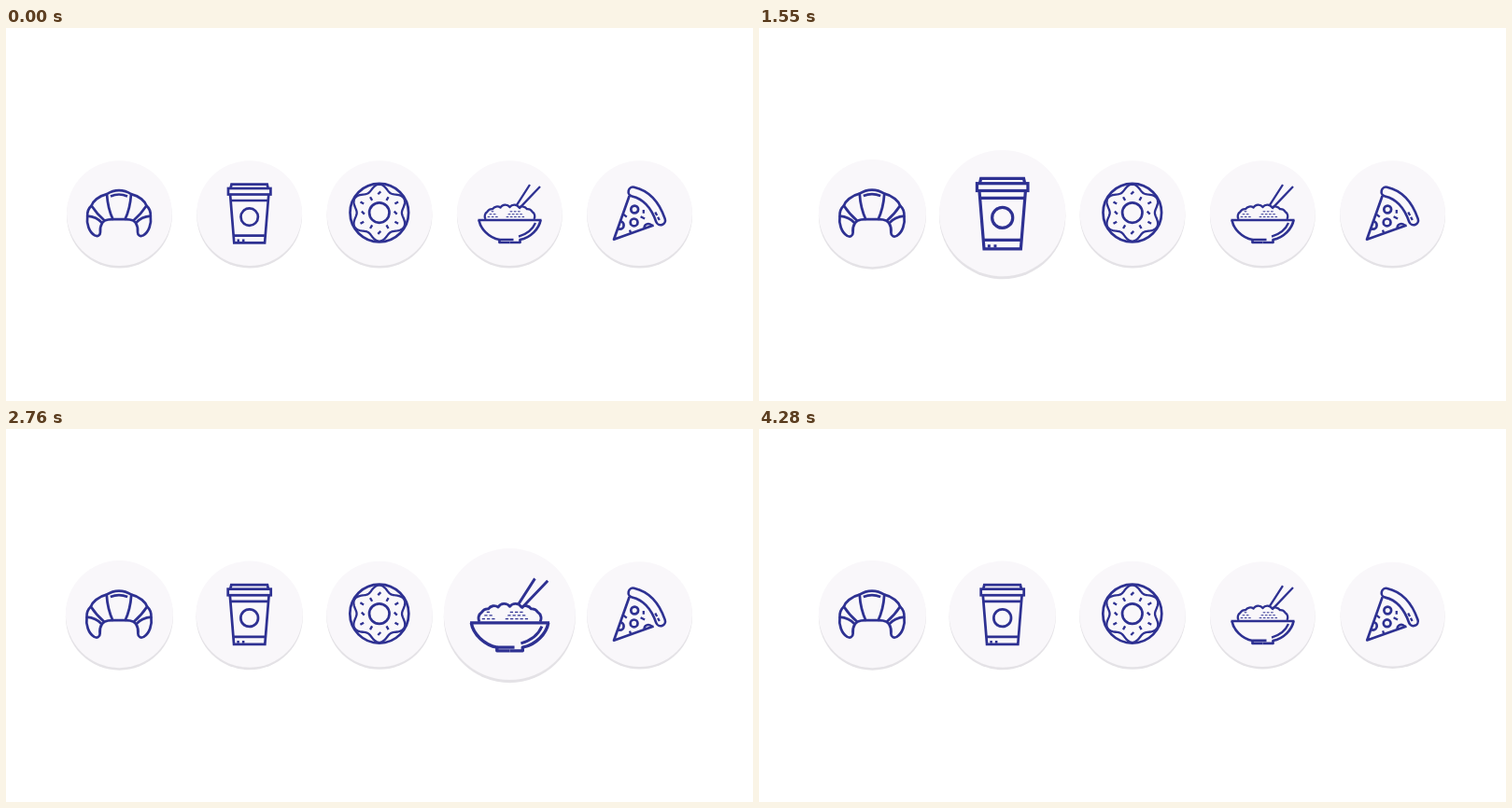
Write an HTML page that moves like this. It is 800 by 400 pixels and loops after 4.35 s.

```html
<!DOCTYPE html>
<html lang="en">
<head>
<meta charset="utf-8">
<title>Food icons</title>
<style>
  html, body { margin: 0; width: 100%; height: 100%; overflow: hidden; background: #fff; }
  svg { display: block; width: 800px; height: 400px; }
  .icon { fill: none; stroke: #2e3192; stroke-width: 2.7; stroke-linejoin: round; }
  .cup { stroke-linejoin: miter; }
  .thin { stroke-width: 2.3; }
  .grain { stroke-width: 1; }
  .crust { stroke-width: 12.6; stroke-linecap: round; }
  .crust.inside { stroke: #f9f7fa; stroke-width: 7.4; }
  .shadow { fill: #e4e2e6; }
  .edge { fill: #98969b; visibility: hidden; }
  .used .edge { visibility: visible; }
  .disc { fill: #f9f7fa; }
</style>
</head>
<body>
<svg viewBox="0 0 800 400">
  <defs>
    <g id="plate">
      <circle class="shadow" cy="2.500" r="56.400"/>
      <circle class="edge" cy="0.500" r="56.400"/>
      <circle class="disc" r="56.400"/>
    </g>
    <g id="wing">
      <path d="M0 -24.500Q-7 -24.500 -13 -20.500Q-12 -5 -6.500 6.500H0"/>
      <path d="M-13 -20.500C-22 -18.500 -28 -12.500 -29.500 -8C-25 -1 -20 4 -15.500 8Q-12 6.500 -6.500 6.500"/>
      <path d="M-29.500 -8C-33 -5 -34 -1 -33.800 3C-27 3.500 -22 6 -18 10.500L-15.500 8"/>
      <path d="M-33.800 3C-35 11 -32 20.500 -26 23.800C-23 25.300 -20 24 -20 20.500C-20.500 16 -19.500 13 -18 10.500"/>
    </g>
    <path id="side" d="M-33 7.400C-31.500 16.400 -22.500 26.400 -11 28.400V31.400H0"/>
    <path id="slice" d="M-11 -18.600L-27.600 28.100L15 12.900"/>
    <path id="arc" d="M-7 -23Q13.500 -18.300 22.400 7.600"/>
    <clipPath id="inSlice"><use href="#slice"/></clipPath>
  </defs>

  <g class="item">
    <use href="#plate"/>
    <g class="icon" transform="translate(-0.400 0)">
      <use href="#wing"/>
      <use href="#wing" transform="scale(-1 1)"/>
      <path d="M-9 -18.200Q0 -22 9 -18.200"/>
    </g>
  </g>

  <g class="item">
    <use href="#plate"/>
    <g class="icon cup">
      <path d="M-20.200 -26.600L-19.200 -31H19L20 -26.600"/>
      <rect x="-22.700" y="-26.600" width="45.400" height="6.500"/>
      <path d="M-20.600 -20L-16.400 31.800H16.400L20.600 -20M-20 -13.600H20M-17 24H17"/>
      <circle cy="4" r="9.200"/>
      <path d="M-13.200 29.300h8" stroke-dasharray="2.500 3"/>
    </g>
  </g>

  <g class="item">
    <use href="#plate"/>
    <g class="icon" transform="translate(-0.200 -0.500)">
      <circle r="31.300"/>
      <circle r="10.700"/>
      <path id="icing" class="thin"/>
      <path id="sprinkles" class="thin"/>
    </g>
  </g>

  <g class="item">
    <use href="#plate"/>
    <g class="icon" transform="translate(0.200 0)">
      <path d="M-34 7.400H34M-11 28.400H4"/>
      <use href="#side"/>
      <use href="#side" transform="scale(-1 1)"/>
      <path class="thin" d="M27.500 10.400C24.500 17.400 18.500 22.400 9.500 25"/>
      <path class="thin" d="M7 -8L21.500 -30.600M10 -5L32.500 -28.600"/>
      <path id="heap" class="thin"/>
      <path id="rice" class="grain"/>
    </g>
  </g>

  <g class="item">
    <use href="#plate"/>
    <g class="icon">
      <use href="#slice"/>
      <circle cx="-5.400" cy="-4.100" r="3.900"/>
      <circle cx="-6" cy="9.800" r="3.900"/>
      <g clip-path="url(#inSlice)">
        <circle cx="-21.300" cy="12.800" r="4.300"/>
        <circle cx="9.300" cy="15.700" r="4.300"/>
      </g>
      <path class="thin" d="M-17.600 1l3.800 3M4.200 -3.600v3.700M1 3.700l4.500 2.200M-10.600 18l1.200 3.500"/>
      <use href="#arc" class="crust"/>
      <use href="#arc" class="crust inside"/>
      <path class="thin" d="M16.700 -1.100L21.200 7.400" stroke-dasharray="4 2"/>
    </g>
  </g>
</svg>

<script>
const LOOP = 4350, GAP = 870, GROW = 30, SHRINK = 680, STEP = 30, STEPS = 5;
const { PI, cos, sin, sqrt, floor, min, max } = Math;

const range = (n, make) => Array.from({ length: n }, (_, i) => make(i));
const setPath = (id, d) => document.getElementById(id).setAttribute("d", d);

// Stroke of a given length centred on x, y
function dash(x, y, angle, length) {
  const dx = cos(angle) * length, dy = sin(angle) * length;
  return `M${x - dx / 2} ${y - dy / 2}l${dx} ${dy}`;
}

// Icing edge with six lobes
setPath("icing", "M" + range(120, i => {
  const a = i * PI / 60, r = 27.3 - 3.2 * cos(6 * a);
  return `${r * cos(a)} ${r * sin(a)}`;
}).join("L") + "Z");

// Radial sprinkles on two alternating rings, every third one twisted
setPath("sprinkles", range(12, i => {
  const a = i * PI / 6, r = i % 2 ? 21.3 : 17.4;
  return dash(r * cos(a), r * sin(a), a + (i % 3 ? 0 : PI / 4), 4.2);
}).join(""));

// Heap of rice: small bumps along a flat arch
const BUMPS = 8;
setPath("heap", range(BUMPS + 1, i => {
  const a = i * PI / BUMPS;
  const point = `${-26 * cos(a)} ${6.4 - 13 * sqrt(max(0, sin(a)))}`;
  return (i ? "A6 6 0 0 1 " : "M") + point;
}).join(""));

// Grains: two clusters whose rows get shorter upwards
const cluster = (left, count) => range(3, row => range(count - row, k =>
  dash(left + row * 2 + k * 4.2, 4 - row * 2.9, 0, 2.6)).join("")).join("");
setPath("rice", cluster(-22.500, 3) + cluster(-2.500, 5));

const items = [...document.querySelectorAll(".item")];
const stepsSince = t => max(0, min(STEPS, floor(t / STEP) + 1));

function draw(now) {
  const t = now % LOOP;
  items.forEach((el, i) => {
    const local = t - i * GAP;
    const up = stepsSince(local - GROW), down = stepsSince(local - SHRINK);
    const rest = 1.02 - 0.007 * i;
    const scale = down === STEPS ? rest : 1 + 0.05 * (up - down);
    el.classList.toggle("used", up > 0);
    el.setAttribute("transform", `translate(${121.4 + 139.3 * i} 198.6) scale(${scale})`);
  });
}

const start = performance.now();
function tick() {
  draw(performance.now() - start);
  requestAnimationFrame(tick);
}
tick();
</script>
</body>
</html>
```
